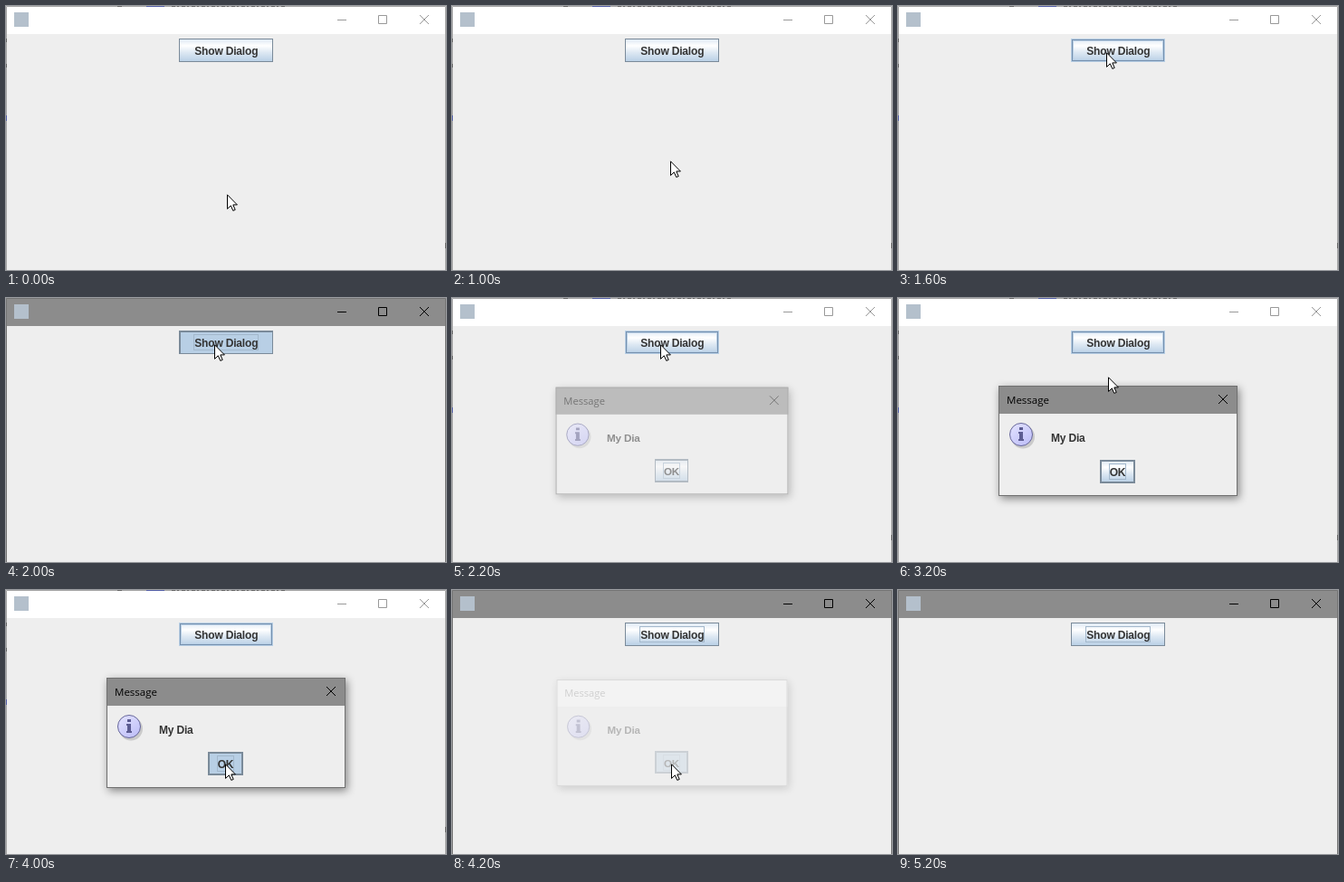
Animation, 486 px wide and 292 px high, one loop 5.6 s. Source, as an HTML page:

```html
<!DOCTYPE html>
<html lang="en">
<head>
<meta charset="utf-8">
<title>Show Dialog</title>
<style>
html, body { margin: 0; width: 100%; height: 100%; overflow: hidden; background: #eee; }
svg { display: block; width: 486px; height: 292px; }
text { font: bold 12px "Liberation Sans", Arial, sans-serif; letter-spacing: -.18px; fill: #333; }
.line { fill: none; stroke-width: 1; }
.crisp { shape-rendering: crispEdges; }

/* every state change is a hard cut on a 200 ms grid */
.stage, .hover, .press, .focus, .dialog, .okpress, .cursor { animation: 5.6s step-end infinite; }

.stage { animation-name: activate; }
@keyframes activate {
  0%, 39.28% { --bar: #fff; --edge: #a6a6a6; --ink: #999; --behind: 1; }
  35.71%, 75%, 100% { --bar: #8c8c8c; --edge: #757575; --ink: #000; --behind: 0; }
}
.bar { fill: var(--bar); }
.edge { stroke: var(--edge); }
.ink { stroke: var(--ink); }
.behind { opacity: var(--behind); }

.hover { animation-name: hover; }
@keyframes hover {
  0%, 35.71%, 75%, 100% { visibility: hidden; }
  25%, 39.28% { visibility: visible; }
}
.press { animation-name: press; }
@keyframes press {
  0%, 39.28%, 100% { visibility: hidden; }
  35.71% { visibility: visible; }
}
.focus { animation-name: focus; }
@keyframes focus {
  0%, 39.28% { visibility: hidden; }
  35.71%, 75%, 100% { visibility: visible; }
}
.okpress { animation-name: okpress; }
@keyframes okpress {
  0% { visibility: hidden; }
  71.42%, 100% { visibility: visible; }
}

.dialog { animation-name: dialog; transform-origin: 243px 157.5px; }
@keyframes dialog {
  0%, 78.57%, 100% { opacity: 0; transform: none; }
  39.28% { opacity: .51; transform: scale(.973); --dbar: #8c8c8c; --dedge: #707070; --dink: #000; --x: 1; }
  42.85% { opacity: 1; transform: none; --dbar: #8c8c8c; --dedge: #707070; --dink: #000; --x: 1; }
  75% { opacity: .3; transform: scale(.966); --dbar: #fff; --dedge: #aaa; --dink: #888; --x: 0; }
}
.shadow { fill: #eee; filter: drop-shadow(2px 3px 5px rgba(0, 0, 0, .45)); }
.dbar { fill: var(--dbar); }
.dedge { stroke: var(--dedge); }
.dclose { stroke: #000; opacity: var(--x); }
.caption { font: 11.5px "Open Sans", "Noto Sans", sans-serif; letter-spacing: 0; fill: var(--dink); }

.cursor { animation-name: move; }
@keyframes move {
  0% { transform: translate(244px, 208px); }
  17.85% { transform: translate(241px, 171px); }
  21.42% { transform: translate(234px, 88px); }
  25% { transform: translate(231px, 56px); }
  28.57% { transform: translate(230px, 51px); }
  57.14% { transform: translate(232px, 87px); }
  60.71% { transform: translate(244px, 187px); }
  64.28% { transform: translate(245px, 204px); }
  67.85% { transform: translate(242px, 192px); }
  82.14% { transform: translate(244px, 184px); }
  85.71% { transform: translate(321px, 107px); }
  89.28% { transform: translate(194px, 269px); visibility: visible; }
  92.85%, 100% { transform: translate(194px, 269px); visibility: hidden; }
}
</style>
</head>
<body>
<svg class="stage" viewBox="0 0 486 292">
  <defs>
    <linearGradient id="steel" x2="0" y2="1">
      <stop offset="0" stop-color="#dde8f3"/>
      <stop offset=".3" stop-color="#fff"/>
      <stop offset=".6" stop-color="#dde8f3"/>
      <stop offset="1" stop-color="#b8cfe5"/>
    </linearGradient>
    <linearGradient id="orb" x2=".7" y2="1">
      <stop offset="0" stop-color="#e4e4ff"/>
      <stop offset="1" stop-color="#c0c0f8"/>
    </linearGradient>
  </defs>

  <!-- main window -->
  <rect width="486" height="292" fill="#eee"/>
  <rect class="bar" width="486" height="31"/>
  <path class="line edge" d="M.5 292V.5H485.5V292"/>
  <g class="line behind">
    <path stroke="#666" d="M123 .5H128M.5 36V40M.5 64V68M485.5 262V268"/>
    <path stroke="#5560a8" d="M155 .5H175M.5 121V127"/>
    <path stroke="#666" stroke-dasharray="4 2 2 3" d="M183 .5H310"/>
  </g>
  <rect x="9" y="7" width="16" height="16" fill="#b4c0cc"/>
  <path class="line ink" d="M366 15.5H376M411.5 10.5H420.5V19.5H411.5ZM457 10L467 20M467 10L457 20"/>

  <!-- button -->
  <g class="crisp">
    <rect x="191.5" y="36.5" width="103" height="25" fill="url(#steel)" stroke="#7a8a99"/>
    <g class="line hover">
      <rect x="191.5" y="36.5" width="103" height="25" stroke="#b8cfe5"/>
      <rect x="192.5" y="37.5" width="101" height="23" stroke="#7590ae"/>
      <rect x="193.5" y="38.5" width="99" height="21" stroke="#b8cfe5"/>
    </g>
    <g class="press">
      <rect x="191" y="36" width="104" height="26" fill="#7a8a99"/>
      <rect x="193" y="38" width="101" height="23" fill="#b8cfe5"/>
    </g>
    <rect class="line focus" x="207.5" y="40.5" width="71" height="17" stroke="#a3b8cc"/>
  </g>
  <text x="208.3" y="54">Show Dialog</text>

  <!-- message box -->
  <g class="dialog">
    <rect class="shadow" x="111" y="97" width="264" height="122"/>
    <rect class="dbar" x="111" y="97" width="264" height="31"/>
    <rect class="line dedge" x="111.5" y="97.5" width="263" height="121"/>
    <text class="caption" x="120" y="117">Message</text>
    <path class="line dclose" d="M354 107L364 117M364 107L354 117"/>

    <circle cx="138" cy="153.5" r="13" fill="#bbb" opacity=".7"/>
    <circle cx="136" cy="151" r="12.5" fill="url(#orb)" stroke="#666699"/>
    <path fill="#5c5c92" d="M134 143h4v3h-4zM133 148h5v8h1v2h-6v-2h1v-6h-1z"/>
    <text x="169" y="159">My Dia</text>

    <g class="crisp">
      <rect x="224" y="180" width="37" height="24" fill="url(#steel)" stroke="#7a8a99" stroke-width="2"/>
      <rect class="okpress" x="225" y="181" width="35" height="22" fill="#b8cfe5"/>
      <rect class="line" x="233.5" y="183.5" width="18" height="17" stroke="#a3b8cc"/>
    </g>
    <text x="233.7" y="197">OK</text>
  </g>

  <path class="cursor" fill="#fff" stroke="#000" d="M.5.8V16.4L4.3 12.8 6.8 18.4 9.2 17.4 6.8 11.9H11.4Z"/>
</svg>
</body>
</html>
```
